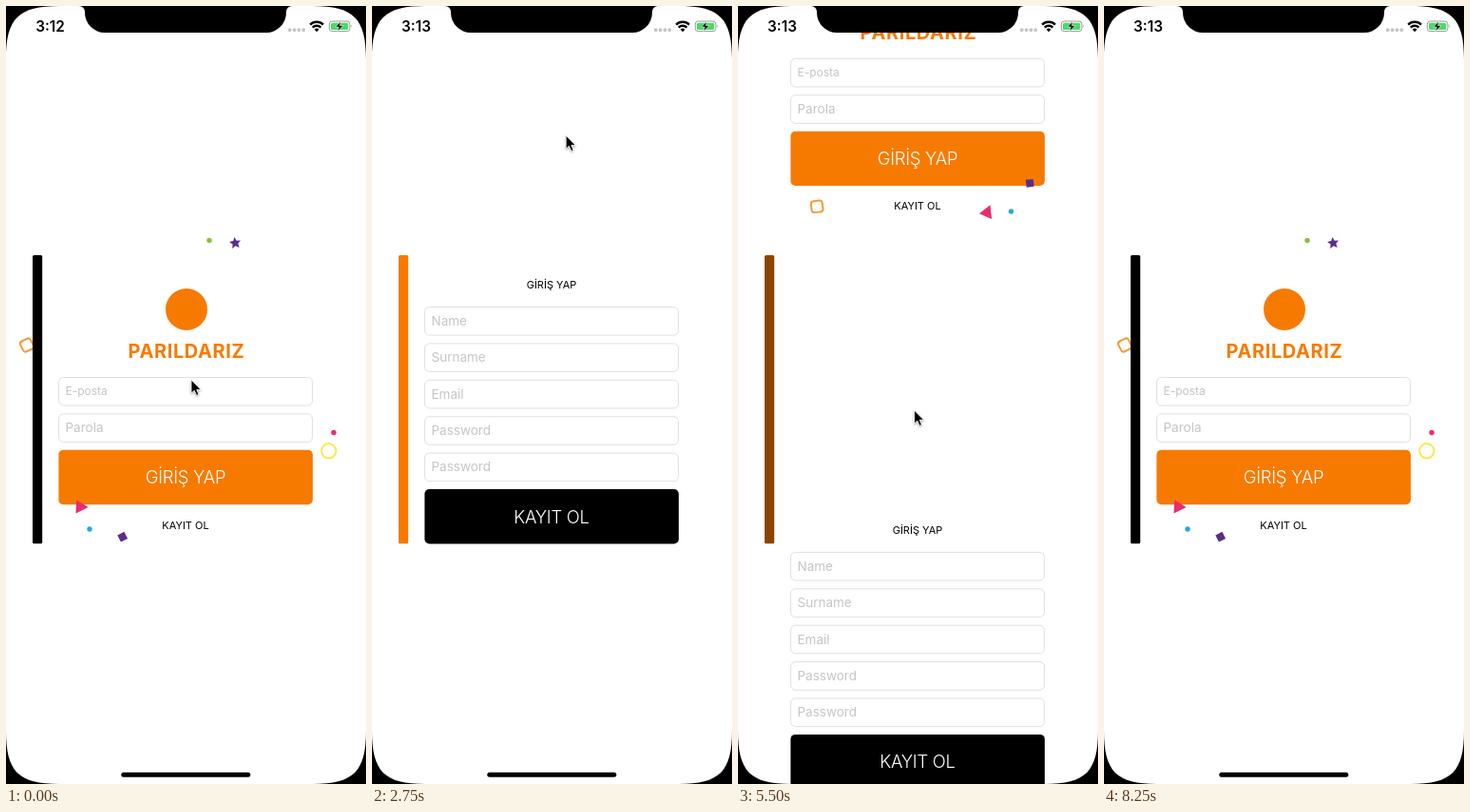
Animation of 379x818 px, one loop 8.5 s. Source, as an HTML page:

```html
<!DOCTYPE html>
<html lang="tr">
<head>
<meta charset="utf-8">
<style>
  html, body { margin: 0; width: 100%; height: 100%; overflow: hidden; background: #fff; }
  svg { display: block; font-family: Inter, Roboto, sans-serif; }
  .label { font-size: 11px; text-anchor: middle; }
  .action { font-size: 18.5px; font-weight: 300; letter-spacing: -.3px; text-anchor: middle; fill: #fff; }
  .hint { fill: #c5c5c9; }
  .box { fill: #fff; stroke: #e0e0e0; }
  #brand { font-size: 20px; font-weight: 700; letter-spacing: .6px; text-anchor: middle; }
  #cursor { filter: drop-shadow(0 1px 1px rgba(0, 0, 0, .35)); }
</style>
</head>
<body>
<svg width="379" height="818" viewBox="0 0 379 818">
  <rect width="379" height="818" fill="#fff"/>
  <g id="login">
    <g fill="#f77a00">
      <circle cx="190" cy="319" r="22"/>
      <text id="brand" x="190" y="370">PARILDARIZ</text>
    </g>
    <g id="loginForm"></g>
    <g id="confetti">
      <path id="star" fill="#5b2d8c"/>
      <circle cx="214" cy="246.5" r="2.7" fill="#8abf40"/>
      <rect x="-6" y="-6" width="12" height="12" rx="3" transform="translate(22 356.5) rotate(-27)" fill="none" stroke="#f59a3d" stroke-width="2"/>
      <circle cx="345" cy="448.5" r="2.7" fill="#ee2a6b"/>
      <circle cx="339.8" cy="467.8" r="7.7" fill="none" stroke="#fbe94c" stroke-width="2"/>
      <path d="M74.2 519.3L86.6 527L73.5 533.6Z" fill="#ee2a6b"/>
      <circle cx="88" cy="550" r="2.7" fill="#29a7df"/>
      <rect x="-4" y="-4" width="8" height="8" transform="translate(122.7 558.2) rotate(-27)" fill="#5b2d8c"/>
    </g>
  </g>
  <g id="signup"></g>
  <rect id="bar" x="28" y="262" width="10.2" height="303.3" rx="1.5"/>

  <path fill-rule="evenodd" d="M0 0H379V818H0ZM0 56V762C0 805 13 818 56 818H323C366 818 379 805 379 762V56C379 13 366 0 323 0H56C13 0 0 13 0 56Z"/>
  <path d="M77 0A6 6 0 0 1 83 6V7A21 21 0 0 0 104 28H274A21 21 0 0 0 295 7V6A6 6 0 0 1 301 0Z"/>
  <rect x="121.3" y="805.8" width="136" height="5" rx="2.5"/>

  <text id="clock" x="46.5" y="27" font-size="15.3" font-weight="600" text-anchor="middle"></text>
  <path d="M298.8 25.2H314" stroke="#c4c4c4" stroke-width="3.8" stroke-linecap="round" stroke-dasharray="0 4.8"/>
  <g fill="none" stroke="#000" stroke-width="2.4">
    <path d="M320.2 19.6A9.8 9.8 0 0 1 334 19.6"/>
    <path d="M322.8 22.6A6 6 0 0 1 331.4 22.6"/>
    <path d="M327.1 27.2L324.7 24.8A3.4 3.4 0 0 1 329.5 24.8Z" fill="#000" stroke="none"/>
  </g>
  <rect x="340.3" y="16" width="21.6" height="10.6" rx="3" fill="#fff" stroke="#999"/>
  <rect x="342" y="17.7" width="18.2" height="7.2" rx="1.5" fill="#4cd964"/>
  <path d="M363.3 19.3Q365 21.3 363.3 23.3Z" fill="#999"/>
  <path d="M352.6 16L346.8 22H350.3L349 26.8L355 20.5H351.4Z" stroke="#fff" stroke-width=".6"/>

  <path id="cursor" d="M0 0V14.3L3.3 11.3L5.6 16.5L8 15.4L5.8 10.4H10.2Z" stroke="#fff" stroke-width=".9"/>
</svg>
<script>
const $ = id => document.getElementById(id);
const LOOP = 8500, STEP = 250, PAGE = 593, ROW = 38.4;

const field = (y, hint, size = 13.5) =>
  `<rect class="box" x="55.5" y="${y + .5}" width="267" height="29.6" rx="5"/>
   <text class="hint" x="62.5" y="${y + 15 + size * .36}" font-size="${size}">${hint}</text>`;
const button = (y, text, color) =>
  `<rect x="55.4" y="${y}" width="267.5" height="57.4" rx="5" fill="${color}"/>
   <text class="action" x="189" y="${y + 35.5}">${text}</text>`;
const label = (y, text, id) => `<text class="label" id="${id}" x="189" y="${y}">${text}</text>`;

$('loginForm').innerHTML = field(390, 'E-posta', 12) + field(390 + ROW, 'Parola') +
  button(390 + 2 * ROW, 'GİRİŞ YAP', '#f77a00') + label(549.5, 'KAYIT OL', 'toSignup');
$('signup').innerHTML = label(296.7, 'GİRİŞ YAP', 'toLogin') +
  ['Name', 'Surname', 'Email', 'Password', 'Password'].map((hint, i) => field(316 + i * ROW, hint)).join('') +
  button(316 + 5 * ROW, 'KAYIT OL', '#000');

$('star').setAttribute('d', 'M' + Array.from({ length: 10 }, (_, i) => {
  const r = i % 2 ? 3 : 6.4, a = i * Math.PI / 5 - 1.7;
  return [241.3 + r * Math.cos(a), 249.3 + r * Math.sin(a)];
}).join('L') + 'Z');

const clamp = u => Math.max(0, Math.min(1, u));
const smooth = u => u * u * (3 - 2 * u);

// A swipe settles like a spring with a slight overshoot, a tap eases in and out.
function swipe(ms) {
  const p = Math.max(0, ms) * .004;
  return 1 - Math.exp(-p * 4 / 3) * (Math.cos(p) + Math.sin(p) * 4 / 3);
}
const tap = ms => smooth(clamp(ms / 850));

const scrollAt = t => PAGE * (swipe(t - 715) - swipe(t - 3184) + tap(t - 5038) - tap(t - 6946));

// Rests of the pointer: time, x, y
const rests = [[0, 195, 393], [1500, 206, 149], [3000, 204, 135], [3500, 201, 536],
  [4750, 179, 550], [6000, 189, 357], [7250, 181, 283], [LOOP, 181, 283]];

function pointerAt(t) {
  const i = rests.findIndex(r => r[0] > t), [t0, x0, y0] = rests[i - 1], [t1, x1, y1] = rests[i];
  const u = smooth((t - t0) / (t1 - t0));
  return [x0 + (x1 - x0) * u, y0 + (y1 - y0) * u];
}

function draw(now) {
  const t = Math.floor(now % LOOP / STEP) * STEP;
  const s = scrollAt(t), mix = clamp(s / PAGE);
  $('login').setAttribute('transform', `translate(0 ${-s})`);
  $('signup').setAttribute('transform', `translate(0 ${PAGE - s})`);
  $('confetti').setAttribute('transform', `rotate(${-.208 * s} 188.6 407.3)`);
  $('bar').setAttribute('fill', `rgb(${247 * mix}, ${122 * mix}, 0)`);
  $('toSignup').setAttribute('opacity', t === 4750 ? .7 : 1);
  $('clock').textContent = t < 2750 ? '3:12' : '3:13';
  $('cursor').setAttribute('transform', `translate(${pointerAt(t)})`);
  $('cursor').setAttribute('visibility', t < 8250 ? 'visible' : 'hidden');
}

const start = performance.now();
(function tick() {
  draw(performance.now() - start);
  requestAnimationFrame(tick);
})();
</script>
</body>
</html>
```
